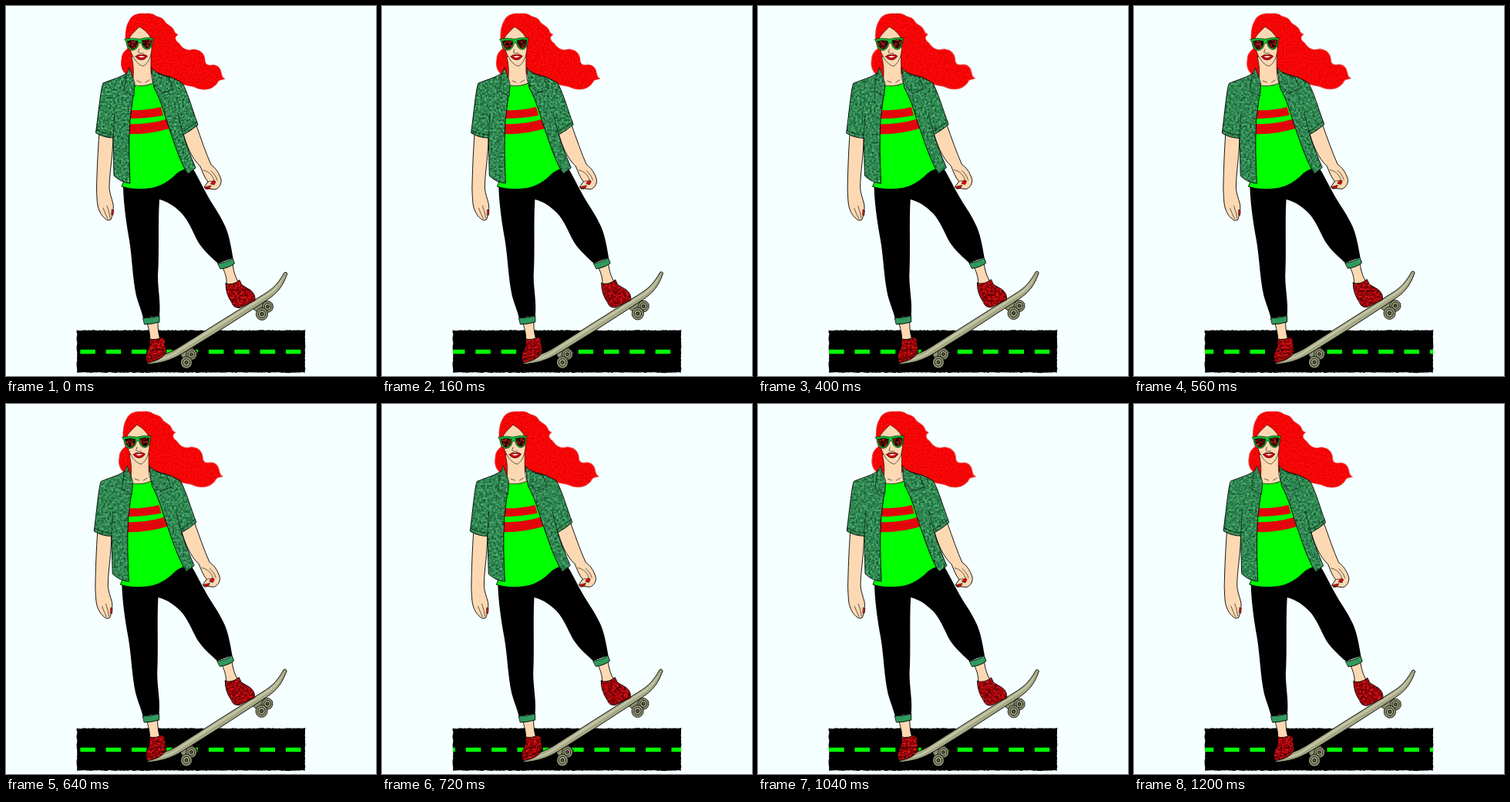
An HTML page for the animation above (1.28 s loop, 480 px wide and 480 px high).

```html
<!DOCTYPE html>
<html lang="en">
<head>
<meta charset="utf-8">
<title>Skater</title>
<style>
  html, body { margin: 0; width: 100%; height: 100%; overflow: hidden; background: #f5ffff; }
  svg { display: block; width: 100%; height: 100%; }
  .line { fill: none; stroke: #000; stroke-width: .9; stroke-linejoin: round; stroke-linecap: round; }
  .thin { stroke-width: .6; }
</style>
</head>
<body>
<svg id="stage" viewBox="0 0 480 480"></svg>
<script>
const STEP = 80, STEPS = 16;
const GREEN = '#00ff00', SKIN = '#fdd9b3', CUFF = '#2f9a5c', RED = '#e2060c';
const DECK = '#a5a884', DECK_LIGHT = '#c3c5a6', WHEEL = '#8d9173';
const DASH_GAP = 100 / 3, DASH_SPEED = 12.5;

const fill = (d, color) => `<path d="${d}" fill="${color}"/>`;
const line = (d, cls = '') => `<path class="line ${cls}" d="${d}"/>`;
const shape = (d, color, cls) => fill(d, color) + line(d, cls);
const glitter = (d, kind) => `<path d="${d}" filter="url(#${kind})"/>`;
const sparkly = (d, kind, cls) => glitter(d, kind) + line(d, cls);

// Each channel is [base, contrast] applied to the noise value.
function glitterFilter(id, freq, ...channels) {
  const rows = channels.map(([base, gain]) => `${gain} 0 0 0 ${base - gain / 2}`).join(' ');
  return `<filter id="${id}" x="0" y="0" width="1" height="1" color-interpolation-filters="sRGB">
    <feTurbulence type="fractalNoise" baseFrequency="${freq}" numOctaves="2" seed="1"/>
    <feColorMatrix values="${rows} 0 0 0 0 1"/>
    <feComposite operator="in" in2="SourceGraphic"/></filter>`;
}

function random(seed) {
  return () => (seed = seed * 16807 % 2147483647) / 2147483647;
}

function roadPath() {
  const rnd = random(41), pts = [];
  const x0 = 92, x1 = 388, y0 = 420.7, y1 = 475.5;
  const add = (x, y) => pts.push((x + rnd() - .5).toFixed(1) + ' ' + (y + rnd() - .5).toFixed(1));
  for (let x = x0; x < x1; x += 2) add(x, y0);
  for (let y = y0; y < y1; y += 2) add(x1, y);
  for (let x = x1; x > x0; x -= 2) add(x, y1);
  for (let y = y1; y > y0; y -= 2) add(x0, y);
  return 'M' + pts.join('L') + 'Z';
}

function wheel(x, y, r) {
  const ring = (k, color) =>
    `<ellipse cx="${x}" cy="${y}" rx="${r * k}" ry="${r * k * 1.05}" fill="${color}" stroke="#000" stroke-width=".8"/>`;
  return ring(1, WHEEL) + ring(.62, DECK) + ring(.28, '#55583f');
}

const hair = () => sparkly(
  'M178 10C170 9 162 13 160 19C156 25 155 33 155 42L158 55C153 59 150 63 150 69C148 77 151 86 157 89' +
  'L168 95L190 88L208 91L222 98C230 103 237 103 244 105C252 109 263 110 270 104C275 101 274 97 278 96L284 94.5' +
  'C280 93 280 89 279 86C278 79 272 75 265 77C259 77 258 73 258 69C257 62 253 58 247 57C243 55 240 58 236 57' +
  'C230 56 227 52 225 49C222 46 219 45 220 40L223 37C218 35 219 33 217 30C214 25 209 25 206 20C203 14 197 15 193 12C188 9 183 10 178 10Z',
  'hair', 'hairline');

const arms = () =>
  shape('M121 164C119 190 118 215 117.5 237C118 250 118 259 121 265C123 271 128 276 132 278L136 277' +
    'C138 272 140 264 139 257C137 249 134.5 243 134 236C134 216 139 194 139 166Z', SKIN) +
  line('M126 262Q129 270 132 276M131 259Q134 267 135 275', 'thin') +
  shape('M137.5 264L139.5 265L139 271L137 271Z', RED, 'thin') +
  shape('M229 162C234 181 241 198 252 208C255 215 257 222 262 228L257 235Q259 239 263 237L271 238' +
    'C276 237 280 231 279 225C276 216 272 210 266 206C259 190 253 172 247 155Z', SKIN) +
  line('M256 213C264 215 268 220 270 226M262 228L267 227M266 214Q272 219 274 226', 'thin') +
  shape('M267 228Q270 225 272 228L270 232L266 231Z', RED, 'thin') +
  shape('M258 235L266 233L264 237L259 237Z', RED, 'thin');

const pants = () => fill(
  'M152 232C152 250 155 276 160 304C164 330 164 352 169 376C172 387 176 396 178 405L199 402' +
  'C201 386 197 368 197 350C199 318 197 282 199 251C211 254 220 261 228 269C237 279 242 292 247 302' +
  'C253 314 264 324 275 334L294.5 327C292 312 289 294 283 283C276 268 268 258 262 247C254 233 248 219 240 207Z', '#000');

const shirt = () =>
  shape('M164 101Q177 106 191 100L202 115L213 150L225 195L240 209C232 212 224 214 218 221' +
    'C208 230 197 236 184 237Q164 239 150 234L158 215L160 150Z', GREEN) +
  fill('M160 135Q181 136 201 131L204 142Q183 146 160 146Z', RED) +
  fill('M159 153Q183 154 208 147L212 159Q185 167 159 166Z', RED);

const neck = () =>
  shape('M163 66C166 78 166 88 164 102Q177 106 191 100C187 93 188 80 188 64Z', SKIN, 'thin') +
  line('M170 97L175 99M181 99L186 96', 'thin');

const jacket = () =>
  sparkly('M158 86C151 92 138 95 126 100C123 107 121 130 116.5 164.5Q127 171 139 171L140 220' +
    'Q149 229 161 230C160 202 159 176 161 148Q164 122 167 104Z', 'denim') +
  sparkly('M190 83C198 89 211 91 216 93L229 100C237 116 242 135 249 154Q240 162 230 167' +
    'C234 181 240 196 246 210L236 218C226 203 219 180 212 160C206 143 202 124 192 106Z', 'denim') +
  sparkly('M160 80L156 89L153 110L166 117L167 100Z', 'denim', 'thin') +
  sparkly('M189 80C193 87 204 91 211 92L217 108L203 113L191 101Z', 'denim', 'thin') +
  line('M117 160.5Q128 167 139 167M248 150Q238 158 229 163M139 171L141 139M230 167L223 139', 'thin');

const face = () =>
  shape('M159 44C161 38 167 33 173 27C180 31 187 37 189 45L189 56C188 67 184 75 178 78' +
    'C172 77 164 68 161 56Z', SKIN, 'thin') +
  line('M173 56L171.5 60L174 61.5L178 61', 'thin') +
  shape('M154 43Q164 40.5 173 43Q182 40 191 41.5L190.5 45Q190 56 183 56.5Q177 56 175.5 48' +
    'L172.5 48Q171 57 164 57.5Q157 57 156 47Z', '#12c933', 'thin') +
  sparkly('M157.5 45.5Q164 43.5 171 45.5Q170.5 55.5 164 56Q158.5 55 157.5 45.5Z', 'lens', 'thin') +
  sparkly('M176.5 45Q182.5 42.5 189 44Q188.5 54.5 183 55Q177.5 54 176.5 45Z', 'lens', 'thin') +
  shape('M168 65.5Q171.5 62 175.5 63.3Q179 61.6 183.5 65Q180 70 176 70Q171 70 168 65.5Z', '#d0060e', 'thin') +
  fill('M171.5 65.6Q176 64 180 65.3Q176 68 171.5 65.6Z', '#fff');

const board = () =>
  shape('M225 448L239 440L249 450L238 461L229 457Z', WHEEL) +
  shape('M318 390L333 381L346 387L337 398L325 396Z', WHEEL) +
  wheel(240.5, 452, 7) + wheel(234, 462.5, 7.4) +
  wheel(339.5, 390, 7) + wheel(332, 399.5, 7.6) +
  shape('M183 461C191 456 210 452 224 443L275 411L328 378C343 369 351 364 361 346' +
    'Q363 344 365 347C357 370 347 376 330 387L277 421L230 450C212 461 200 463 186 464.5Q182 464.5 183 461Z', DECK) +
  fill('M187 460.5C206 456 215 453 225 445L275 413L329 379.5C344 370 352 366 361.5 348' +
    'C354 369 345 373 329 382.5L276 416L226 447.5C215 456 204 460 187 460.5Z', DECK_LIGHT);

const feet = () =>
  shape('M183 411C186 422 188 430 186 438L202 437C198 429 197 420 197 410Z', SKIN) +
  shape('M281 339C285 348 287 355 286 363L302 359C297 351 295 343 294 334Z', SKIN) +
  shape('M178 405Q189 405 199 402L199 410Q189 413 180 413Z', CUFF) +
  shape('M275 334Q286 333 294 327L296.5 334Q289 340 278.5 341Z', CUFF) +
  sparkly('M186 432Q196 434 202 429.5L206 432L208 449Q203 457 194 460L184 463Q179 458 183 449Q188 441 186 432Z', 'shoe') +
  sparkly('M285 360Q294 363 303 355.5L306 362L317 368.5Q324 374 323 382L303 391.5Q295 392 293 385Q285 374 285 360Z', 'shoe') +
  line('M186 448Q195 444 206 446M182 458Q196 457 207 449M294 383Q300 373 310 367', 'thin');

const stage = document.getElementById('stage');
stage.innerHTML = `<style>.hairline { stroke: #e00808; stroke-width: .5; }</style><defs>
  ${glitterFilter('denim', .38, [.19, .55], [.53, .8], [.32, .6])}
  ${glitterFilter('hair', .5, [.96, .25], [.02, .2], [.02, .2])}
  ${glitterFilter('shoe', .4, [.62, 1.3], [.02, .3], [.04, .3])}
  ${glitterFilter('lens', .35, [.36, 1.8], [.04, .5], [.03, .4])}
  <clipPath id="roadClip"><rect x="92" y="420" width="296" height="56"/></clipPath></defs>
  ${fill(roadPath(), '#000')}
  <g clip-path="url(#roadClip)"><path id="dashes" fill="${GREEN}"/></g>
  <g id="skater">${[hair, arms, pants, shirt, neck, jacket, face, board, feet].map(part => part()).join('')}</g>`;

const dashes = document.getElementById('dashes');
const skater = document.getElementById('skater');
const noises = stage.querySelectorAll('feTurbulence');
let shown = -1;

function draw(time) {
  const k = Math.floor(time / STEP) % STEPS;
  if (k === shown) return;
  shown = k;
  let d = '';
  const start = 96.3 + (k * DASH_SPEED) % DASH_GAP - 2 * DASH_GAP;
  for (let x = start; x < 390; x += DASH_GAP) d += `M${x.toFixed(2)} 445.8h19.5v5.5h-19.5z`;
  dashes.setAttribute('d', d);
  const lean = -.42 * Math.sin(Math.PI * k / STEPS);
  skater.setAttribute('transform', `rotate(${lean.toFixed(3)} 185 462)`);
  noises.forEach((noise, i) => noise.setAttribute('seed', k * 7 + i + 1));
}

const begin = performance.now();
function tick() {
  draw(performance.now() - begin);
  requestAnimationFrame(tick);
}
tick();
</script>
</body>
</html>
```
